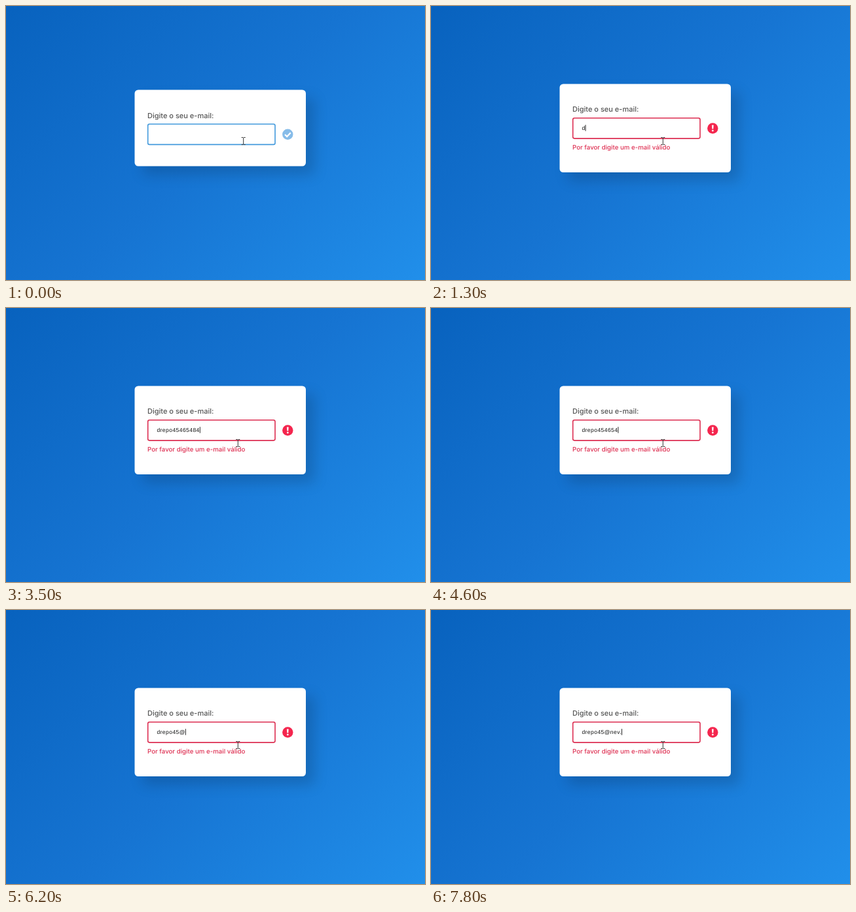
Recreate the animation shown at these times as an HTML page. Size 640x420 px, loop 8000 ms.

```html
<!DOCTYPE html>
<html lang="pt-BR">
<head>
<meta charset="utf-8">
<title>Validação de e-mail</title>
<style>
  html, body { margin: 0; width: 100%; height: 100%; overflow: hidden; }
  body { background: linear-gradient(135deg, #0862be, #1674d2 50%, #218fea); }
  svg { display: block; width: 640px; height: 420px; text-rendering: geometricPrecision; }
  text { white-space: pre; }
  .card { fill: #fff; filter: drop-shadow(13px 13px 10px rgba(0, 0, 0, .15)); }
  .label { font: 500 11px Inter, sans-serif; fill: #555; }
  .field { fill: #fff; stroke: #4299dc; stroke-width: 1.6; }
  .typed { font: 8.5px "Liberation Sans", sans-serif; letter-spacing: .45px; fill: #111; }
  .message { font: 500 9.68px Inter, sans-serif; fill: #de3153; }
  .tip rect { fill: #4b4b4b; stroke: #e4e4e4; }
  .tip text { font: 7.55px "Open Sans", sans-serif; fill: #fff; }
  .invalid .field { stroke: #dc2d50; }
  .invalid .ok, .bad, .message { visibility: hidden; }
  .invalid .bad, .invalid .message { visibility: visible; }
</style>
</head>
<body>
<svg id="stage" viewBox="0 0 640 420">
  <rect id="card" class="card" x="196.5" y="128.5" width="261.5" height="117" rx="5.5"/>
  <g id="form">
    <text class="label" x="216" y="171.7">Digite o seu e-mail:</text>
    <rect class="field" x="216.7" y="181" width="194.3" height="31.4" rx="2.5"/>
    <text id="typed" class="typed" x="230.4" y="199.6"></text>
    <rect id="caret" y="191.5" width=".9" height="9.5" fill="#111"/>
    <g class="ok">
      <circle cx="430.3" cy="196.8" r="8.2" fill="#86bce9"/>
      <path d="M426 197l3.2 3.1 5.6-5.9" fill="none" stroke="#fff" stroke-width="2.2"/>
    </g>
    <g class="bad">
      <circle cx="430.3" cy="196.8" r="8.2" fill="#f4264e"/>
      <path d="M428.9 191.7h2.8l-.5 6h-1.8z" fill="#fff"/>
      <circle cx="430.3" cy="200.4" r="1.45" fill="#fff"/>
    </g>
    <text class="message" x="216" y="229">Por favor digite um e-mail válido</text>
  </g>
  <path id="pointer" d="M-3 -5.5h2.2l.8.7.8-.7h2.2M0 -4.8V4.8M-3 5.5h2.2l.8-.7.8.7h2.2"
        fill="none" stroke="#333" stroke-width="1"/>
  <g id="tip" class="tip">
    <rect id="tipBox" x="354.5" y="210.5" height="15"/>
    <text id="tipText" x="359.3" y="221"></text>
  </g>
</svg>
<script>
  const LOOP = 8000;
  const $ = id => document.getElementById(id);
  const [stage, card, form, typed, caret, pointer, tip, tipBox, tipText] =
    ['stage', 'card', 'form', 'typed', 'caret', 'pointer', 'tip', 'tipBox', 'tipText'].map($);

  const user = 'drepo', number = '45465484', address = user + '45@nev.';
  const digits = n => user + number.slice(0, n);

  // [start time, value]; each value holds until the next entry
  const typing = [
    [0, ''], ...[...user].map((_, i) => [1300 + 100 * i, user.slice(0, i + 1)]),
    [2500, digits(1)], [2600, digits(2)], [2900, digits(3)], [3100, digits(4)],
    [3200, digits(6)], [3400, digits(7)], [3500, digits(8)], [4000, digits(7)],
    [4600, digits(6)], [4700, digits(5)], [4800, digits(4)], [5000, digits(3)],
    [5100, digits(2)], [6100, address.slice(0, 8)], [7300, address.slice(0, 9)],
    [7400, address.slice(0, 10)], [7600, address.slice(0, 11)], [7800, address]
  ];
  const blink = [
    [0, false], [400, true], [900, false], [1300, true], [2200, false], [2500, true],
    [4500, false], [4600, true], [5200, false], [5600, true], [6800, false], [7300, true]
  ];
  const missingAt = name => `Inclua um "@" no endereço de email. "${name}" não contém um "@".`;
  const tips = [
    [0, null],
    [2200, [missingAt(user), 242]], [2500, null],
    [5800, [missingAt(digits(2)), 253]], [5900, null],
    [6800, [`Insira uma parte após "@". "${address.slice(0, 8)}" está incompleto.`, 214.5]],
    [7300, null]
  ];
  const at = (track, t) => track.findLast(([start]) => start <= t)[1];
  const show = (el, on) => el.setAttribute('visibility', on ? 'visible' : 'hidden');

  function pointerAt(t) {
    if (t < 100) return [362.7, 207];
    const k = Math.min(1, Math.max(0, (Math.floor(t / 100) - 3) / 6));
    return [356 - 1.7 * k, 195 + 12 * k];
  }

  function draw(t) {
    const invalid = t >= 1300;
    stage.classList.toggle('invalid', invalid);
    card.setAttribute('y', invalid ? 119.5 : 128.5);
    card.setAttribute('height', invalid ? 135.5 : 117);
    form.setAttribute('transform', `translate(0 ${invalid ? -9.3 : 0})`);

    const value = at(typing, t);
    typed.textContent = value;
    caret.setAttribute('x', 230.4 + (value ? typed.getComputedTextLength() : 0));
    show(caret, at(blink, t));
    pointer.setAttribute('transform', `translate(${pointerAt(t)})`);

    const hint = at(tips, t);
    show(tip, hint);
    if (hint) {
      tipText.textContent = hint[0];
      tipBox.setAttribute('width', hint[1]);
    }
  }

  const begin = performance.now();
  function tick() {
    draw((performance.now() - begin) % LOOP);
    requestAnimationFrame(tick);
  }
  tick();
</script>
</body>
</html>
```
